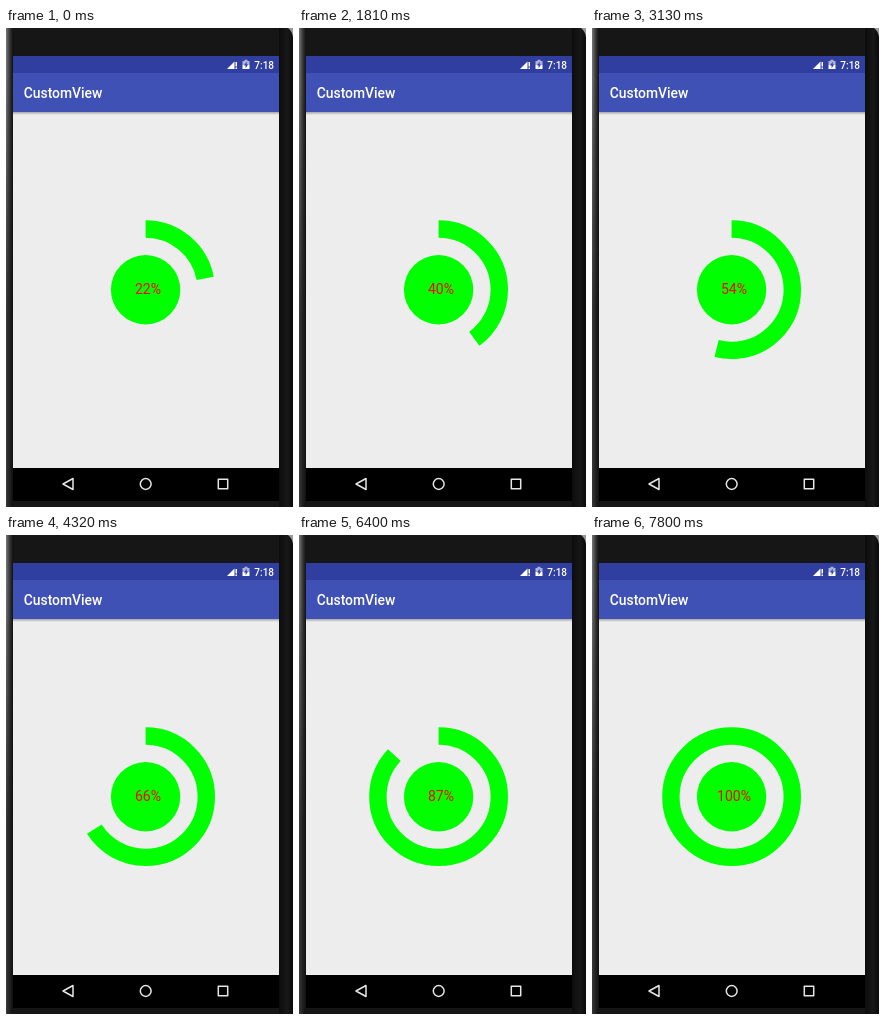
These frames come from a looping animation (287 px wide and 479 px high, 7.95 s). An HTML page:

```html
<!DOCTYPE html>
<html lang="en">
<head>
<meta charset="utf-8">
<title>Progress ring</title>
<style>
  html, body { margin: 0; width: 100%; height: 100%; overflow: hidden; background: #141414; }
  svg { display: block; width: 287px; height: 479px; }
  text { font-family: Roboto, Arial, sans-serif; }
  .bar { fill: #fff; font-weight: 500; }
  .nav { fill: none; stroke: #e6e6e6; stroke-width: 1.5; stroke-linejoin: round; }
</style>
</head>
<body>
<svg viewBox="0 0 287 479">
  <defs>
    <linearGradient id="left">
      <stop offset="0" stop-color="#777"/>
      <stop offset=".5" stop-color="#3c3c3c"/>
      <stop offset="1" stop-color="#101010"/>
    </linearGradient>
    <linearGradient id="right">
      <stop offset="0" stop-color="#0c0c0c"/>
      <stop offset=".6" stop-color="#181818"/>
      <stop offset="1" stop-color="#0a0a0a"/>
    </linearGradient>
    <linearGradient id="fade" x2="0" y2="1">
      <stop offset=".1" stop-color="#111" stop-opacity="0"/>
      <stop offset=".6" stop-color="#111" stop-opacity=".6"/>
    </linearGradient>
    <linearGradient id="shade" x2="0" y2="1">
      <stop offset="0" stop-color="#000" stop-opacity=".3"/>
      <stop offset="1" stop-color="#000" stop-opacity="0"/>
    </linearGradient>
  </defs>

  <!-- phone body -->
  <rect width="287" height="479" fill="#161616"/>
  <rect width="7" height="479" fill="url(#left)"/>
  <rect width="7" height="479" fill="url(#fade)"/>
  <rect x="273" width="14" height="479" fill="url(#right)"/>
  <path d="M282 0Q286 3 287 9V0Z" fill="#999"/>

  <!-- screen -->
  <rect x="7" y="28" width="266" height="445"/>
  <rect x="7" y="83" width="266" height="357" fill="#ededed"/>
  <rect x="7" y="28" width="266" height="17" fill="#303f9f"/>
  <rect x="7" y="45" width="266" height="39" fill="#3f51b5"/>
  <rect x="7" y="84" width="266" height="3" fill="url(#shade)"/>
  <text class="bar" x="17.7" y="70" font-size="13.9">CustomView</text>

  <!-- status icons -->
  <g fill="#fff">
    <path d="M221 41L228.5 33.5V41Z"/>
    <path d="M229.5 34h1.5v4.5h-1.5zM229.5 39.5h1.5v1.5h-1.5z"/>
    <path d="M236.5 33h2v-1.2h3v1.2h2v4h-7z" opacity=".6"/>
    <path d="M236.5 37h7v4h-7z"/>
  </g>
  <path d="M240.7 33.8L238 37.6h1.6v2.7l2.5-3.8h-1.4z" fill="#303f9f"/>
  <text class="bar" x="248.3" y="40.5" font-size="10">7:18</text>

  <!-- navigation -->
  <g class="nav">
    <path d="M67 450.5V461.5L57 456Z"/>
    <circle cx="139.7" cy="456" r="5.4"/>
    <rect x="212.3" y="451.3" width="9.4" height="9.4"/>
  </g>

  <!-- progress -->
  <g transform="translate(139.6 261.7)">
    <circle id="ring" r="60.7" fill="none" stroke="#0f0" stroke-width="17.4"
      pathLength="100" stroke-dasharray="22 200" transform="rotate(-90)"/>
    <circle r="34.7" fill="#0f0"/>
  </g>
  <text id="label" x="142" y="266" font-size="14" fill="#f00" text-anchor="middle">22%</text>
</svg>
<script>
  const LOOP = 7950;
  const START = 22.3;
  const MS_PER_PERCENT = 98;
  const ring = document.getElementById('ring');
  const label = document.getElementById('label');

  function draw() {
    const time = performance.now() % LOOP;
    const percent = Math.min(100, Math.floor(START + time / MS_PER_PERCENT));
    ring.setAttribute('stroke-dasharray', percent < 100 ? `${percent} 200` : 'none');
    label.textContent = `${percent}%`;
    requestAnimationFrame(draw);
  }
  draw();
</script>
</body>
</html>
```
